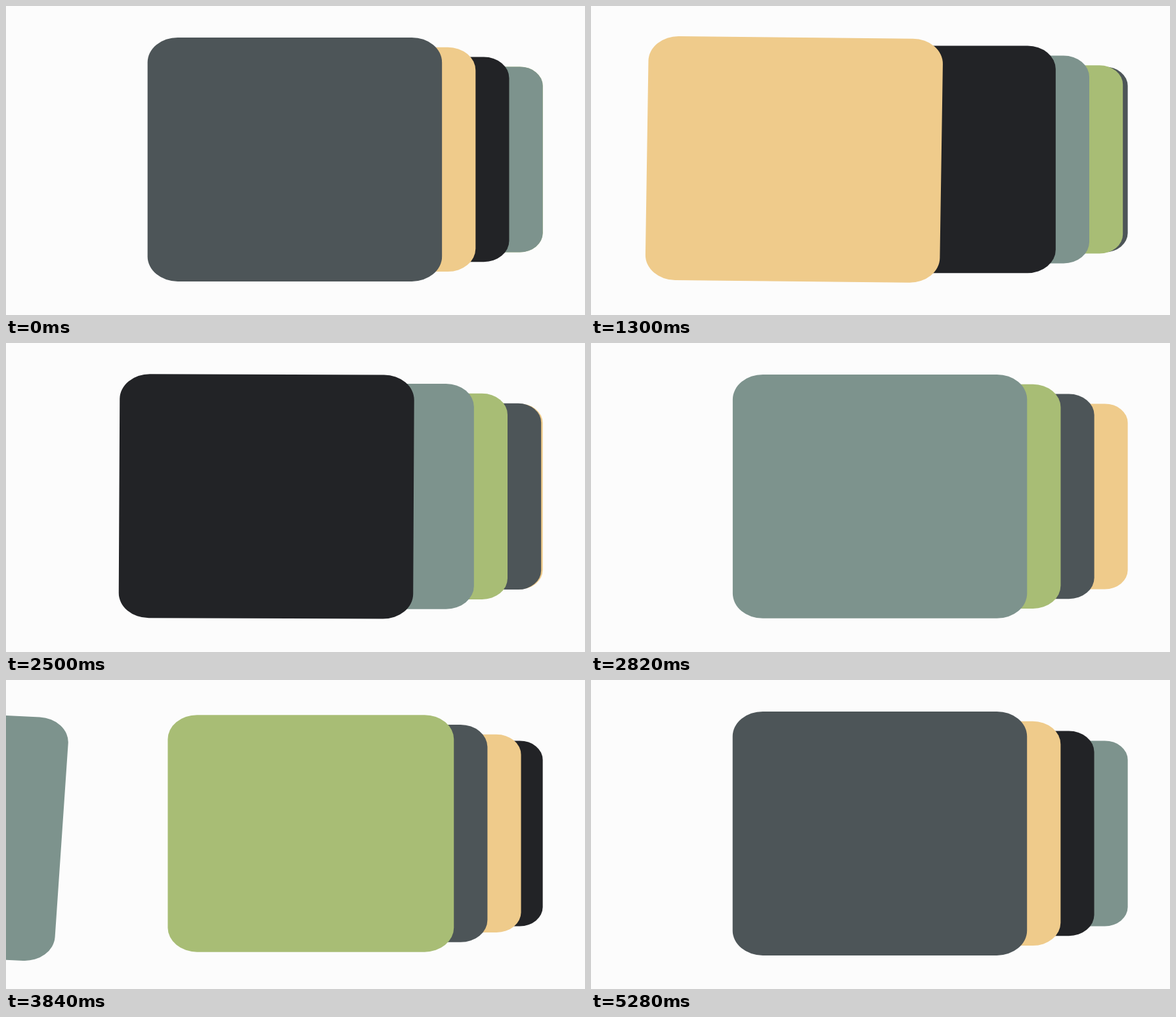
Recreate the animation shown at these times as an HTML page with a canvas. Size 882 by 470 pixels, loop 5.38 s.

```html
<!DOCTYPE html>
<html lang="en">
<head>
<meta charset="utf-8">
<title>Card stack</title>
<style>
  html, body { margin: 0; width: 100%; height: 100%; overflow: hidden; background: #fcfcfc; }
  canvas { display: block; }
</style>
</head>
<body>
<canvas id="stage" width="882" height="470"></canvas>
<script>
const ctx = document.getElementById("stage").getContext("2d");
const LOOP = 5380, DURATION = 370;
const STARTS = [42, 1253, 2477, 3702, 4926];
const COLORS = ["#4d5558", "#efcb8b", "#222326", "#7d938d", "#a8bd75"];
const SIZE = 371, RADIUS = 38;
const STRETCH = 448.5 / SIZE; // cards are squares on a widened stage
const CENTER = { x: 439.9, y: 233.4 };
const SLOT_GAP = 69.1, SLOT_SHRINK = 0.08, LAST_SLOT = 3;
const EXIT_X = -2 * 448, EXIT_TURN = 5 * Math.PI / 180;

// cubic-bezier(.25, .1, .25, 1)
function ease(x) {
  if (x <= 0 || x >= 1) return Math.min(1, Math.max(0, x));
  let lo = 0, hi = 1;
  for (let i = 0; i < 24; i++) {
    const s = (lo + hi) / 2;
    if (0.75 * s * (1 - s) + s ** 3 < x) lo = s; else hi = s;
  }
  return 0.3 * lo * (1 - lo) ** 2 + 3 * lo * lo * (1 - lo) + lo ** 3;
}

function drawCard(color, x, scale, turn) {
  ctx.setTransform(STRETCH, 0, 0, 1, x, CENTER.y);
  ctx.rotate(turn);
  ctx.scale(scale, scale);
  ctx.fillStyle = color;
  ctx.beginPath();
  ctx.roundRect(-SIZE / 2, -SIZE / 2, SIZE, SIZE, RADIUS);
  ctx.fill();
}

// A negative slot means the card is leaving to the left.
function placeCard(color, slot) {
  if (slot < 0) {
    drawCard(color, CENTER.x - slot * EXIT_X, 1, -slot * EXIT_TURN);
  } else {
    const s = Math.min(slot, LAST_SLOT);
    drawCard(color, CENTER.x + s * SLOT_GAP, 1 - s * SLOT_SHRINK, 0);
  }
}

function render(t) {
  const moves = STARTS.filter(s => s <= t).length;
  const front = Math.max(0, moves - 1);
  const progress = moves ? ease((t - STARTS[front]) / DURATION) : 0;
  const done = progress >= 1;
  ctx.setTransform(1, 0, 0, 1, 0, 0);
  ctx.fillStyle = "#fcfcfc";
  ctx.fillRect(0, 0, 882, 470);
  for (let i = 4; i >= 0; i--) {
    const color = COLORS[(front + i + (done ? 1 : 0)) % COLORS.length];
    const slot = done ? i : i === 0 ? -progress : i - progress;
    // The rearmost card waits behind the last slot.
    placeCard(color, !done && i === 4 ? LAST_SLOT : slot);
  }
}

const begin = performance.now();
function tick() {
  render((performance.now() - begin) % LOOP);
  requestAnimationFrame(tick);
}
tick();
</script>
</body>
</html>
```
